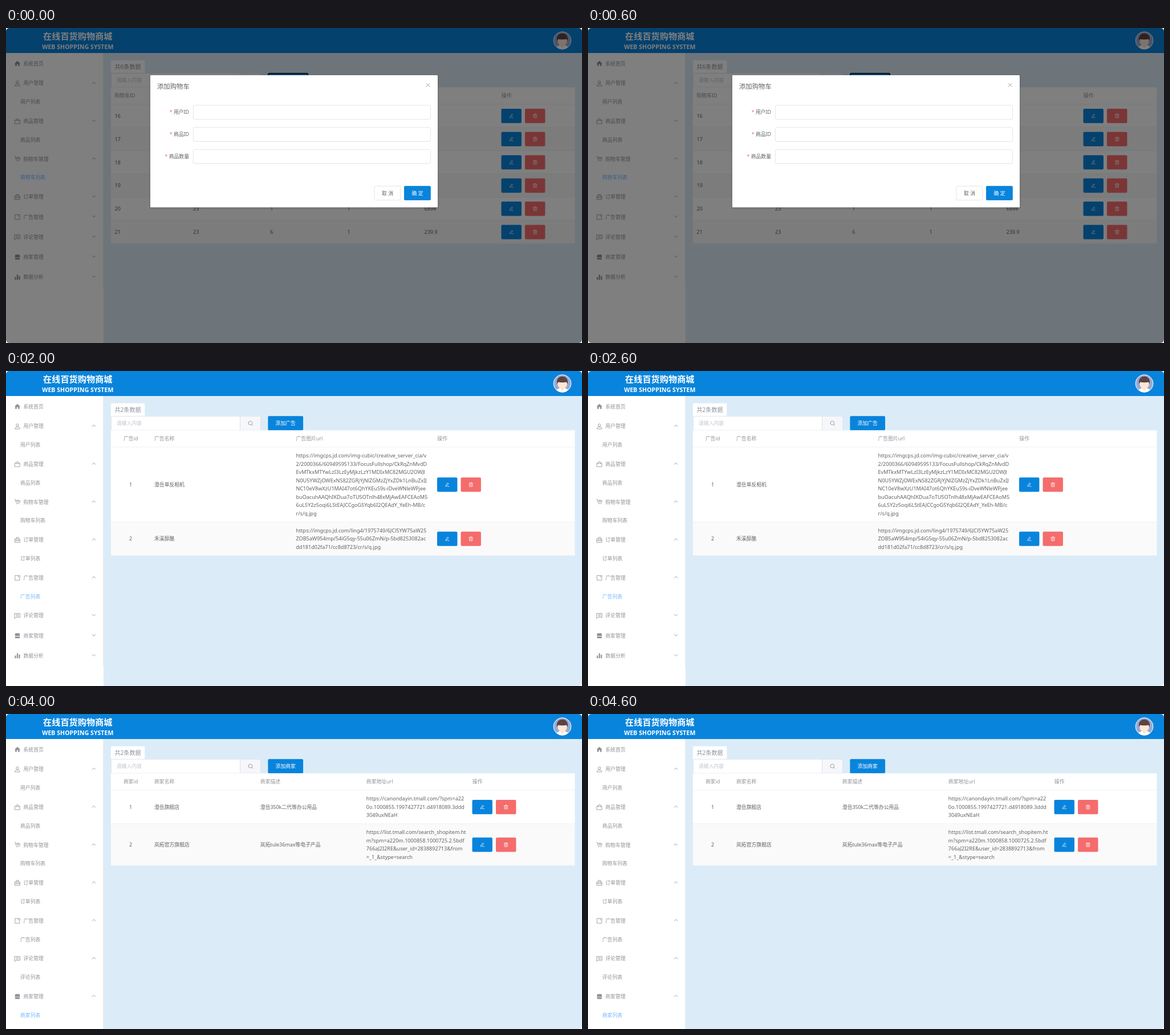
Write an HTML page that moves like this. It is 1010 by 554 pixels and loops after 5000 ms.

```html
<!DOCTYPE html>
<html lang="zh">
<head>
<meta charset="utf-8">
<title>在线百货购物商城</title>
<style>
html, body { margin: 0; width: 100%; height: 100%; overflow: hidden; background: #fff; }
svg { display: block; width: 1010px; height: 554px; border-radius: 6px; }
text { font: 8.84px "Noto Sans", "Noto Sans CJK SC", "Noto Sans CJK", sans-serif; fill: #606266; white-space: pre; }
.grey { fill: #909399; }
.hint { fill: #c0c4cc; }
.active { fill: #74b9ff; }
.white { fill: #fff; }
.bold { font-weight: 700; }
.medium { font-weight: 500; }
.mid { text-anchor: middle; }
.end { text-anchor: end; }
.line { fill: none; stroke: #909399; stroke-width: .85; stroke-linecap: round; stroke-linejoin: round; }
.pale { stroke: #fff; stroke-width: .75; }
.view { visibility: hidden; animation: show 5s step-end infinite; }
@keyframes show { 0% { visibility: visible; } 20%, 100% { visibility: hidden; } }
</style>
</head>
<body>
<svg id="stage" viewBox="0 0 1010 554"></svg>
<script>
const BLUE = '#0984dc', RED = '#f56c6c', EDGE = '#dcdfe6';

const rect = (x, y, w, h, fill, extra = '') =>
  `<rect x="${x}" y="${y}" width="${w}" height="${h}" fill="${fill}" ${extra}/>`;
const box = (x, y, w, h, fill = '#fff', r = 2.5) =>
  rect(x, y, w, h, fill, `rx="${r}" stroke="${EDGE}" stroke-width=".8"`);
const path = (d, cls = 'line') => `<path class="${cls}" d="${d}"/>`;
const at = (x, y, body) => `<g transform="translate(${x} ${y})">${body}</g>`;
// y is the optical middle of the line
const text = (x, y, str, cls = '', size = 8.84) =>
  `<text x="${x}" y="${(y + size * .365).toFixed(2)}" class="${cls}" style="font-size:${size}px">${str}</text>`;

const icons = {
  home: path('M-5 .3L0-4.6 5 .3H3.8V4.4H1.2V1.2H-1.2V4.4H-3.8V.3Z', 'grey'),
  user: path('M-2.3-2a2.3 2.3 0 1 0 4.6 0a2.3 2.3 0 1 0-4.6 0M-4.3 4.3C-4.3-.2 4.3-.2 4.3 4.3Z'),
  bag: path('M-4.2-1.8H4.2V4.5H-4.2ZM-2-.3V-2.5C-2-5.3 2-5.3 2-2.5V-.3'),
  cart: path('M-4.8-4.4H-3.4L-1.8 2H3.4L4.7-2.2H-2.8M-1.2 4.2h.1M2.9 4.2h.1M1-4.2V-.6M-.3-1.8L1-.5 2.3-1.8'),
  order: path('M-4.3-1.8H4.3V4.4H-4.3ZM-2-1.8V-4.4H2V-1.8M-4.3 1H4.3M-1.8.2V1.8M1.8.2V1.8'),
  ad: path('M1-4H-4.2V4.4H4V.2M1.4-2.7a1.7 1.7 0 1 0 3.4 0a1.7 1.7 0 1 0-3.4 0'),
  chat: path('M-4.6-3.8H4.6V3H-2.3L-4.6 4.7ZM-2.3-1.6H2.3M-2.3.7H2.3'),
  shop: path('M-3.7-4.3H3.7L4.6.6H-4.6ZM-4 1.5H4V4.4H-4Z', 'grey'),
  chart: path('M-4.6-.3h2.2V4.5h-2.2ZM-1.1-4.4h2.2V4.5h-2.2ZM2.4-2h2.2V4.5h-2.2Z', 'grey'),
  pen: path('M-2.7 2.9L-2.3.9.6-3.1 2.3-1.9-.7 2.1ZM.3 3.1H3.3', 'line pale'),
  bin: path('M-3.5-2.2H3.5M-1.3-2.4V-3.5H1.3V-2.4M-2.6-2V3.4H2.6V-2M-.9-.5V1.9M.9-.5V1.9', 'line pale'),
};

const groups = [
  ['user', '用户'], ['bag', '商品'], ['cart', '购物车'], ['order', '订单'],
  ['ad', '广告'], ['chat', '评论'], ['shop', '商家'], ['chart', '数据分析'],
];

function menu(open) {
  let y = 97.2, out = '';
  groups.forEach(([icon, name], i) => {
    const label = icon === 'chart' ? name : name + '管理';
    const isOpen = i < open;
    out += at(20, y, icons[icon]) + text(30.5, y, label, 'grey') +
      at(154, y - .9, path(isOpen ? 'M-2.8 1.3L0-1.4 2.8 1.3' : 'M-2.8-1.3L0 1.4 2.8-1.3'));
    if (isOpen) {
      out += text(25, y + 32.8, name + '列表', i === open - 1 ? 'active' : 'grey');
      y += 31.3;
    }
    y += 35.3;
  });
  return rect(170.3, 44, .7, y - 61, '#e6e6e6') + out;
}

function button(x, y, w, fill, body) {
  return rect(x, y, w, 25.2, fill, 'rx="2"') + body;
}

const isCjk = s => /[\u4e00-\u9fff]/.test(s);

function cell(x, y, value, cls) {
  const lines = value.split('\n');
  const size = isCjk(value) ? 8.84 : 9.05;
  return lines.map((s, i) => text(x, y + (i - (lines.length - 1) / 2) * 14.5, s, cls, size)).join('');
}

function table({ cols, rows, hover }) {
  const first = cols[0][0] > 200 ? 'mid' : '';
  const last = cols[cols.length - 1][0];
  let y = 134.1;
  let out = rect(184, 104.3, 813.5, 30, '#fff') +
    cols.map(([x, name], i) => text(x, 119.2, name, 'grey ' + (i ? '' : first))).join('');
  rows.forEach((row, r) => {
    const n = Math.max(...row.map(v => v.split('\n').length));
    const h = n > 1 ? 14.5 * n + 15.55 : 40.85;
    const c = y + h / 2;
    const fill = r === hover ? '#f5f7fb' : r % 2 ? '#fafafa' : '#fff';
    out += rect(184, y, 813.5, h, fill) + rect(184, y - .6, 813.5, .7, '#ebeef5') +
      row.map((v, i) => cell(cols[i][0], c, v, i ? '' : first)).join('') +
      button(last - .3, c - 12.6, 35.4, BLUE, at(last + 17.4, c, icons.pen)) +
      button(last + 41.2, c - 12.6, 35.4, RED, at(last + 58.9, c, icons.bin));
    y += h;
  });
  return out + rect(184, y - .6, 813.5, .7, '#ebeef5');
}

function dialog() {
  const field = (y, name) => box(328.4, y - 12.4, 416, 24.8) +
    text(321, y, `<tspan fill="${RED}">*</tspan> ${name}`, 'end');
  return rect(0, 0, 1010, 554, '#000', 'opacity=".5"') +
    rect(253, 83, 504, 232.5, '#fff', 'rx="1.3" style="filter:drop-shadow(0 1px 1.5px rgba(0,0,0,.3))"') +
    text(265, 103.3, '添加购物车', '', 11.36) +
    at(740, 100.4, path('M-3-3L3 3M3-3L-3 3')) +
    field(148.2, '用户ID') + field(187.1, '商品ID') + field(226.1, '商品数量') +
    box(645.8, 278.1, 46, 24.6) + text(669, 290.4, '取 消', 'mid medium') +
    button(698, 277.8, 46.8, BLUE, text(721.5, 290.4, '确 定', 'mid medium white'));
}

const avatarUrl = `https://images.cnblog
s.com/cnblogs_com/b
logs/715063/gallerie
s/2053375/t_2110291
04329_zk.jpg?a=1635
936617445`;
const remark = (id, goods, body, time) => [id, '1', goods, 'guest', avatarUrl, body, time];

const views = [
  { total: 6, add: '添加购物车', focus: true, modal: true,
    cols: [[190.5, '购物车ID'], [328, ''], [463.3, ''], [598.5, ''], [733.5, ''], [868.8, '操作']],
    rows: [['16'], ['17'], ['18'], ['19'],
      ['20', '23', '1', '1', '6898'], ['21', '23', '6', '1', '239.9']] },
  { total: 8, add: '添加订单',
    cols: [[218.7, '订单id'], [260, '用户id'], [366.4, '订单时间'], [472.8, '订单状态'],
      [579, '订单总价'], [685.3, '商品详情'], [791.5, '购物车列表'], [897.8, '操作']],
    rows: [
      ['9', '1', '20211221210931231', '0', '13796.00', '澄岳350k二代', '11'],
      ['10', '1', '20211221212120003', '0', '13943.00', '岚拓tule36max,美式宽\n肩带帆布外套,云汀木夏\n休闲鞋', '12,13,14'],
      ['11', '1', '20211221223222265', '0', '7766.00', '云汀木夏休闲鞋,岚拓t\nule36max', '15,16'],
      ['12', '1', '20211223150933920', '0', '13466.00', '岚拓tule36max,澄岳3\n50k二代', '9,10'],
      ['14', '1', '20211224131917652', '0', '7396.80', '牧岭醇,SONVELO/听澜客,\n乐川社Glider,栎音QX5', '12,13,14,15'],
      ['15', '23', '20230309145653456', '0', '6568.00', '岚拓tule36max', '20'],
      ['17', '23', '20230309160603380', '0', '45.00', '菜刀木纹座木H刀架', '22'],
      ['18', '23', '20230309161917675', '1', '208.00', '美式宽肩带帆布外套', '23'],
    ] },
  { total: 2, add: '添加广告',
    cols: [[218.7, '广告id'], [260, '广告名称'], [508.5, '广告图片url'], [756.3, '操作']],
    rows: [
      ['1', '澄岳单反相机', `https://imgcps.jd.com/img-cubic/creative_server_cia/v
2/2000366/60949595133/FocusFullshop/CkRqZnMvdD
EvMTkxMTYwLzI3LzEyMjkzLzY1MDIxMC82MGU2OWJl
N0U5YWZjOWExNS82ZGRjYjNlZGMzZjYxZDk1LnBuZxIJ
NC10eV8wXzU1MAI47ot6QhYKEuS9s-iDveWNleWPjee
buOacuhAAQhIKDua7oTU5OTnlh48xMjAwEAFCEAoM5
6uL5Y2z5oqi6LStEAJCCgoG5Yqb6I2QEAdY_YeEh-MB/c
r/s/q.jpg`],
      ['2', '禾溪醇酪', `https://imgcps.jd.com/ling4/1975749/6JCl5YW75aW25
ZOB5aW954mp/54iG5qy-55u06ZmN/p-5bd8253082ac
dd181d02fa71/cc8d8723/cr/s/q.jpg`],
    ] },
  { total: 6, hover: 1,
    cols: [[218.7, '评论id'], [260, '用户id'], [366.4, '商品id'], [472.8, '用户昵称'],
      [579, '用户头像url'], [685.3, '评论内容'], [791.5, '评论时间'], [897.8, '操作']],
    rows: [
      remark('2', '2', '66666', '2021-12-21 21:21:00'),
      remark('3', '7', '66', '2021-12-21 22:32:09'),
      remark('4', '18', '星屿传yyds', '2021-12-23 15:09:47'),
      remark('5', '19', '孤鸦!!!', '2021-12-23 15:10:02'),
      remark('6', '19', '66', '2021-12-23 15:10:20'),
    ] },
  { total: 2, add: '添加商家',
    cols: [[218.7, '商家id'], [260, '商家名称'], [445.8, '商家描述'], [631.8, '商家地址url'], [817.8, '操作']],
    rows: [
      ['1', '澄岳旗舰店', '澄岳350k二代等办公用品', `https://canondayin.tmall.com/?spm=a22
0o.1000855.1997427721.d4918089.3ddd
3049uxNEaH`],
      ['2', '岚拓官方旗舰店', '岚拓tule36max等电子产品', `https://list.tmall.com/search_shopitem.ht
m?spm=a220m.1000858.1000725.2.5bdf
766aJ2I2RE&amp;user_id=2838892713&amp;from
=_1_&amp;stype=search`],
    ] },
];

function view(v, i) {
  const w = v.add ? v.add.length * 8.84 + 26.3 : 0;
  const add = !v.add ? '' : button(459.4, 79.2, w, BLUE, text(459.4 + w / 2, 91.8, v.add, 'mid medium white')) +
    (v.focus ? rect(459.9, 79.7, w - 1, 24.2, 'none', 'rx="2" stroke="#000" stroke-width="1.3"') : '');
  return `<g class="view" style="animation-delay:${i - 5}s">` + menu(i + 3) +
    text(190.5, 68.2, `共${v.total}条数据`, 'grey', 10.1) + add + table(v) + (v.modal ? dialog() : '') + '</g>';
}

const avatar = `<clipPath id="round"><circle r="15.3"/></clipPath>` +
  `<circle r="15.4" fill="#98a9d6" stroke="#fff" stroke-width="1"/><g clip-path="url(#round)">` +
  path('M-12 16C-11 9-6 8 0 8S11 9 12 16Z', 'white') +
  `<path fill="#f9dcc4" d="M-3 6H3V9L0 13-3 9Z"/>` +
  `<ellipse cy="1" rx="8.2" ry="8.6" fill="#fde8d6"/>` +
  `<path fill="#5d4340" d="M-9.3 1C-11-8-6-12.5 0-12.5S11-8 9.3 1L7.5-2.5C3-1.5-3-1.5-7.5-2.5Z"/></g>`;

const shell = rect(0, 0, 1010, 554, '#dbecf8') + rect(0, 44, 171, 510, '#fff') +
  rect(0, 0, 1010, 44, BLUE) +
  text(125.8, 14.6, '在线百货购物商城', 'mid bold white', 15.2) +
  text(125.8, 33, 'WEB SHOPPING SYSTEM', 'mid bold white', 10.6) +
  at(975.5, 22, avatar) +
  at(20, 62.3, icons.home) + text(30.5, 62.3, '系统首页', 'grey') +
  rect(184, 56.8, 59.4, 23, '#fff', 'rx="1.5"') +
  box(184.4, 79.5, 226.2, 24.8, '#fff', 1.5) + box(410.6, 79.5, 36.2, 24.8, '#f5f7fa', 1.5) +
  text(194, 91.9, '请输入内容', 'hint') +
  at(428.6, 91.8, path('M-3.6-.3a3.4 3.4 0 1 0 6.8 0a3.4 3.4 0 1 0-6.8 0M2.2 2.2L3.9 3.9'));

document.getElementById('stage').innerHTML = shell + views.map(view).join('');
</script>
</body>
</html>
```
